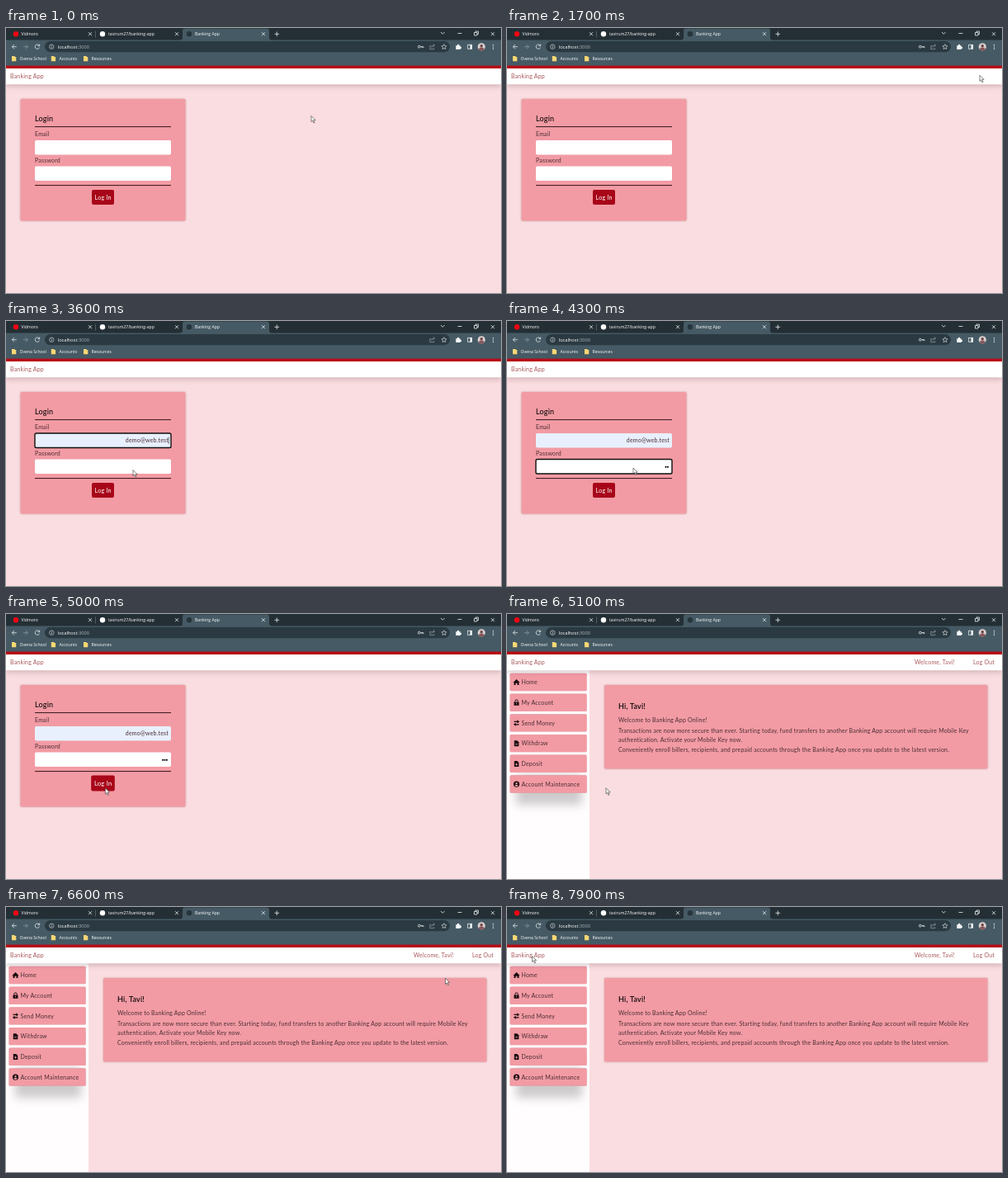
An HTML page that plays this animation: 600x321 px, repeating every 8 s.

```html
<!DOCTYPE html>
<html lang="en">
<head>
<meta charset="utf-8">
<title>Banking App</title>
<style>
  html, body { margin: 0; width: 100%; height: 100%; overflow: hidden; background: #fadde0; }
  svg { display: block; width: 100vw; height: 100vh; }
  text { white-space: pre; }
  .ui { font: 500 5.1px "Open Sans", "Noto Sans", sans-serif; fill: #fff; }
  .url { font-size: 5.7px; }
  .page { font: 7px Lato, "Open Sans", sans-serif; letter-spacing: .195px; fill: #4c2d33; }
  .head { font-size: 9px; font-weight: 500; fill: #140a0c; }
  .bold { font-weight: 600; }
  .nav { fill: #a9575a; }
  .line { fill: none; stroke: #e8edef; stroke-width: .8; }
  .rule { stroke: #33161a; stroke-width: 1; }
  .card { fill: #f29ba4; filter: drop-shadow(0 .7px 1.2px rgba(90, 30, 40, .35)); }
  .item { fill: #f29ba4; filter: drop-shadow(0 .5px .7px rgba(110, 40, 50, .25)); }
  .bar { fill: #fff; filter: drop-shadow(0 2px 3px rgba(70, 30, 40, .25)); }
  .shade { fill: rgba(0, 0, 0, .2); filter: blur(6px); }
  .field { fill: #fff; }
  .filled { fill: #e8f0fe; }
  .focus { stroke: #101010; stroke-width: 1.4; }
  .icon { fill: #180c0e; }
  .cut { fill: none; stroke: #f29ba4; stroke-width: .8; }
</style>
</head>
<body>
<svg viewBox="0 0 600 321" preserveAspectRatio="none">
  <rect width="600" height="321" fill="#fadde0"/>

  <g id="login">
    <rect class="card" x="17.5" y="86" width="200" height="147.5" rx="1.5"/>
    <g class="page">
      <text class="head" x="35" y="113">Login</text>
      <text x="35" y="131.3">Email</text>
      <text x="35" y="163.2">Password</text>
    </g>
    <path class="rule" d="M35 119.6H200M35 190.6H200"/>
    <rect id="email" class="field" x="35" y="136" width="165" height="17.5" rx="1.8"/>
    <rect id="pass" class="field" x="35" y="167.5" width="165" height="17.5" rx="1.8"/>
    <text id="address" class="page" x="197" y="147.3" text-anchor="end">demo@web.test</text>
    <g id="dots" fill="#151515">
      <circle cx="194.9" cy="176.8" r="1.1"/>
      <circle cx="192.5" cy="176.8" r="1.1"/>
      <circle cx="190.1" cy="176.8" r="1.1"/>
    </g>
    <path id="caret" stroke="#222" stroke-width=".6" d="M197.2 140.5v8.5"/>
    <g id="button">
      <rect x="104" y="196" width="27" height="18" rx="2" fill="#a80519"/>
      <text class="page" x="117.7" y="207.6" text-anchor="middle" style="fill:#fff;font-size:7.2px">Log In</text>
    </g>
  </g>

  <g id="home">
    <rect y="68" width="100" height="253" fill="#fffdfe"/>
    <rect class="shade" x="11" y="195" width="80" height="36"/>
    <g id="menu"></g>
    <rect class="card" x="118" y="86" width="464.5" height="101.5" rx="1.5"/>
    <g class="page">
      <text class="head bold" x="135" y="115.2">Hi, Tavi!</text>
      <text x="135" y="131">Welcome to Banking App Online!</text>
      <text x="135" y="144">Transactions are now more secure than ever. Starting today, fund transfers to another Banking App account will require Mobile Key</text>
      <text x="135" y="155.3">authentication. Activate your Mobile Key now.</text>
      <text x="135" y="166.7">Conveniently enroll billers, recipients, and prepaid accounts through the Banking App once you update to the latest version.</text>
    </g>
  </g>

  <rect class="bar" y="48" width="600" height="20.3"/>
  <text class="page nav" x="5" y="61.4">Banking App</text>
  <g id="user" class="page nav">
    <text x="542.7" y="61.4" text-anchor="end">Welcome, Tavi!</text>
    <text x="565" y="61.4">Log Out</text>
  </g>

  <rect width="600" height="15" fill="#242f35"/>
  <path fill="#455a64" d="M211 14.5q3 0 3-3v-8q0-3 3-3h99q3 0 3 3v8q0 3 3 3H600V46H0V14.5z"/>
  <rect y="45.6" width="600" height="3.4" fill="#b90716"/>
  <rect x="47" y="16" width="491" height="13.2" rx="6.6" fill="#2b3a42"/>

  <circle cx="12" cy="7.2" r="3.2" fill="#f00612"/>
  <circle cx="117" cy="7.2" r="3.2" fill="#fff"/>
  <circle cx="222" cy="7.2" r="3.2" fill="#26353c"/>
  <g class="ui">
    <text x="18.5" y="9.3">Vidmoro</text>
    <text x="124" y="9.3">tavirum27/banking-app</text>
    <text x="229" y="9.3">Banking App</text>
    <text class="url" x="62.7" y="24.8">localhost<tspan fill="#a9b4b9">:3000</tspan></text>
    <text x="16.5" y="39.3">Ovena School</text>
    <text x="64.5" y="39.3">Accounts</text>
    <text x="103.5" y="39.3">Resources</text>
  </g>
  <g id="folders" fill="#f8d775"></g>

  <g class="line">
    <path id="closers"/>
    <path stroke="#5d6a70" d="M108.5 3.5v8"/>
    <path d="M325.5 7.3h5.6M328.3 4.5v5.6M527 5l2.3 2.3L531.6 5M547.5 6.5h5M567.5 5.5h3.5v3.5h-3.5zM569 5.5V4h3.5v3.5H571"/>
    <path d="M12.8 22.7H7.5M10 20l-2.7 2.7L10 25.4"/>
    <path stroke="#8b999f" d="M21 22.7h5.3M23.8 20l2.7 2.7-2.7 2.7"/>
    <path d="M40.3 21.3a2.7 2.7 0 1 0 .2 2.3M40.7 19.5v2.2h-2.2"/>
    <circle cx="55.3" cy="22.7" r="2.7" stroke-width=".6"/>
    <path stroke-width=".7" d="M55.3 22.2v2M55.3 20.8v.7"/>
    <path stroke="#a9b4b9" stroke-width=".6" d="M515.5 21.5h-1.7v4.2h5v-1.5M515.7 23.8q.3-2.8 3.5-2.8M517.8 19.5l1.7 1.5-1.7 1.5"/>
    <path stroke-width=".6" d="M531 19.7l.9 2 2.2.2-1.7 1.5.5 2.2-1.9-1.2-1.9 1.2.5-2.2-1.7-1.5 2.2-.2z"/>
    <rect x="559.7" y="20.3" width="5" height="5"/>
  </g>
  <g fill="#f4f7f8">
    <path d="M545.3 21.3h1.7a1.1 1.1 0 1 1 2.1 0h1.6v1.6a1.1 1.1 0 1 1 0 2.1v1h-5.4z"/>
    <rect x="562.5" y="20.3" width="2.2" height="5"/>
    <circle cx="590.5" cy="20.5" r=".7"/>
    <circle cx="590.5" cy="22.9" r=".7"/>
    <circle cx="590.5" cy="25.3" r=".7"/>
  </g>
  <g id="key" class="line">
    <circle cx="500.8" cy="22.7" r="1.4"/>
    <path d="M502.2 22.7h3.8v1.4M504.3 22.7v1.3"/>
  </g>
  <circle cx="576.3" cy="22.8" r="4.6" fill="#d9cfcf"/>
  <path fill="#8a5559" d="M572.8 25.8q.6-2.2 3.5-2.2t3.5 2.2q-1.4 1.6-3.5 1.6t-3.5-1.6z"/>
  <circle cx="576.3" cy="21.7" r="1.7" fill="#6b4347"/>

  <path id="mouse" fill="#fff" stroke="#333" stroke-width=".6" stroke-linejoin="round"
        d="M0 0v7.1l1.6-1.5 1.3 2.9 1.2-.5-1.3-2.9h2.3z"/>
</svg>

<script>
  const LOOP = 8000, STEP = 100;
  const $ = id => document.getElementById(id);

  // Menu icons are drawn around their own centre.
  const items = [
    ["Home", '<path d="M-4 .3L0-3.5 4 .3H3v3.2H1V1.2H-1v2.3H-3V.3z"/>'],
    ["My Account", '<path d="M-3-.7h6v4.2h-6z"/><path fill="none" stroke="#180c0e" d="M-1.7-.5v-1.2a1.7 1.7 0 0 1 3.4 0v1.2"/><path class="cut" d="M0 .5v1.6"/>'],
    ["Send Money", '<path d="M-3-2.2h3.8v-1.5L3.6-1.6.8.5V-1H-3zM3 2.6h-3.8v1.2L-3.6 1.8-.8-.2v1.5H3z"/>'],
    ["Withdraw", '<path d="M-2.7-3.5h3.5l2 2v5h-5.5z"/><path class="cut" d="M-1.5 1h3"/>'],
    ["Deposit", '<path d="M-2.7-3.5h3.5l2 2v5h-5.5z"/><path class="cut" d="M-1.5.8h3M0-.7v3"/>'],
    ["Account Maintenance", '<circle r="3.6"/><circle cy="-1" r="1.2" fill="#f29ba4"/><path fill="#f29ba4" d="M-2.1 2Q-1.5.7 0 .7T2.1 2Q1.2 2.9 0 2.9T-2.1 2z"/>']
  ];
  $("menu").innerHTML = items.map(([name, icon], i) => {
    const y = 82.6 + i * 24.7;
    return `<rect class="item" x="3.5" y="${y - 10.8}" width="93.2" height="21.4" rx="1.5"/>
      <g class="icon" transform="translate(11.5 ${y})">${icon}</g>
      <text class="page" x="17.5" y="${y + 2.5}">${name}</text>`;
  }).join("");

  $("folders").innerHTML = [7, 54.8, 94].map(x =>
    `<path d="M${x} 34h3.6v1h1.7v5.2h-5.3z"/>`).join("");
  $("closers").setAttribute("d", [102, 207, 312, 590].map(x =>
    `M${x - 2} 5.2l4 4m0-4l-4 4`).join(""));

  // Pointer path: time, x, y
  const path = [
    [0, 370, 106.5], [300, 370, 106.5], [1000, 443, 103], [1200, 443, 103],
    [1600, 568, 60], [1700, 573, 57.3], [1900, 560, 62], [2400, 166, 144],
    [2900, 160, 147], [3300, 156, 174], [3600, 154, 180.5], [4000, 153, 178],
    [4400, 153, 178], [4800, 121, 211], [5100, 120, 210.8], [5300, 118, 205],
    [5700, 140, 111], [6000, 215, 108], [6400, 480, 92], [6600, 532.5, 86.3],
    [6800, 570, 66], [7000, 590, 60], [7100, 588, 60], [7500, 142, 60],
    [7700, 52, 60], [7900, 30.5, 59.5], [8000, 30.5, 59.5]
  ];

  function pointAt(t) {
    const i = path.findIndex(p => p[0] > t);
    const [t0, x0, y0] = path[i - 1], [t1, x1, y1] = path[i];
    const k = (t - t0) / (t1 - t0);
    return [x0 + (x1 - x0) * k, y0 + (y1 - y0) * k];
  }

  const show = (el, on) => { el.style.display = on ? "" : "none"; };

  function draw(now) {
    const t = Math.floor(now % LOOP / STEP) * STEP;
    const between = (a, b) => t >= a && t < b;
    const signedIn = t >= 5100;

    show($("login"), !signedIn);
    show($("home"), signedIn);
    show($("user"), signedIn);
    show($("key"), !between(2900, 4300));

    $("email").classList.toggle("filled", t >= 2900);
    $("email").classList.toggle("focus", between(2500, 4000));
    $("pass").classList.toggle("focus", between(4000, 4900));
    show($("address"), t >= 2900);
    show($("caret"), between(2500, 4000) && (t - 2500) % 1000 < 500);
    [...$("dots").children].forEach((dot, i) => show(dot, t >= 4200 + i * 100));

    const grow = between(4700, 5100) ? 1.06 : 1;
    $("button").setAttribute("transform",
      `translate(117.5 205) scale(${grow}) translate(-117.5 -205)`);
    $("mouse").setAttribute("transform", `translate(${pointAt(t)})`);
  }

  function tick() {
    draw(performance.now());
    requestAnimationFrame(tick);
  }
  tick();
</script>
</body>
</html>
```
